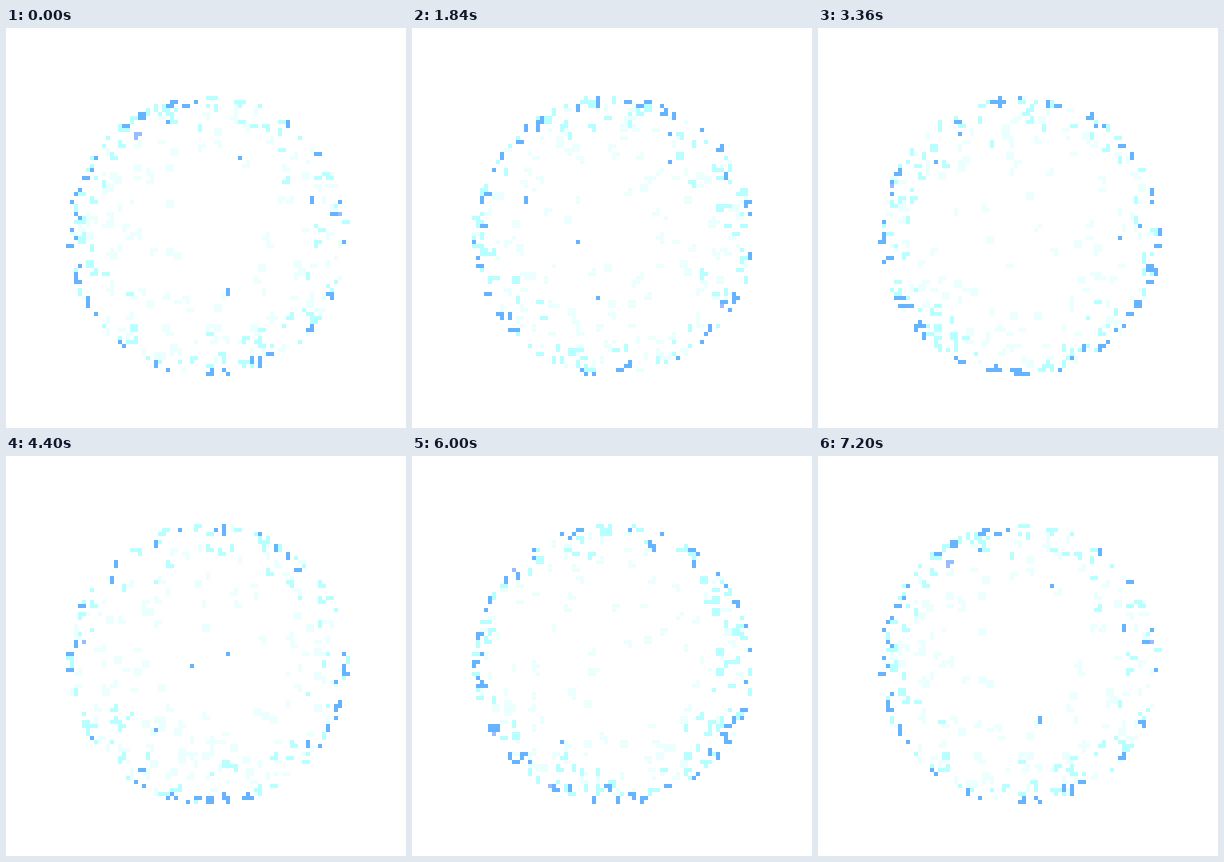
Recreate the animation shown at these times as an HTML page with a canvas. Size 400 by 400 pixels, loop 7.28 s.

```html
<!DOCTYPE html>
<html lang="en">
<head>
<meta charset="utf-8">
<title>Pixel sphere</title>
<style>
  html, body { margin: 0; width: 100%; height: 100%; overflow: hidden; background: #fff; }
  canvas { display: block; width: 400px; height: 400px; }
</style>
</head>
<body>
<canvas id="stage" width="400" height="400"></canvas>
<script>
const ctx = document.getElementById('stage').getContext('2d');
const CELL = 4, STEP = 80, STEPS = 91, TURN = 90;
const CX = 50.5, CY = 52, R = 34.7, COUNT = 720;
const BLUE = '#66b3ff', VIOLET = '#99bbff', CYAN = '#b8ffff', PALE = '#ecffff', WHITE = '#fff';

let seed = 20417;
function rand() {
  seed = (seed + 0x6d2b79f5) | 0;
  let n = Math.imul(seed ^ (seed >>> 15), seed | 1);
  n ^= n + Math.imul(n ^ (n >>> 7), n | 61);
  return ((n ^ (n >>> 14)) >>> 0) / 4294967296;
}

// Points spread evenly over the sphere
const points = Array.from({ length: COUNT }, () => {
  const y = rand() * 2 - 1;
  return {
    y,
    ring: Math.sqrt(1 - y * y),
    lon: rand() * Math.PI * 2,
    shift: rand() * 0.9 - 0.25,
    size: 0.5 + rand() * 0.28,
    edge: rand() < 0.03 ? VIOLET : BLUE,
    seeThrough: rand() < 0.015
  };
});

// Pale in front, blue towards the rim
function tint(p, z) {
  const light = z + p.shift * (1 - 0.6 * z);
  if (z < 0 || light < 0.3) return p.edge;
  if (light < 0.62) return CYAN;
  return light < 0.94 ? PALE : WHITE;
}

// Fill every cell whose centre lies inside the disc
function disc(x, y, r) {
  for (let j = Math.floor(y - r); j <= y + r; j++) {
    for (let i = Math.floor(x - r); i <= x + r; i++) {
      if (i < 15 || i > 85 || j < 17 || j > 86) continue;
      if (Math.hypot(i + 0.5 - x, j + 0.5 - y) < r) {
        ctx.fillRect(i * CELL, j * CELL, CELL, CELL);
      }
    }
  }
}

function draw(step) {
  const turn = step / TURN * Math.PI * 2;
  ctx.fillStyle = WHITE;
  ctx.fillRect(0, 0, 400, 400);
  points
    .map(p => ({
      p,
      x: p.ring * Math.sin(p.lon + turn),
      z: p.ring * Math.cos(p.lon + turn)
    }))
    .filter(q => q.z >= 0 || q.p.seeThrough)
    .sort((a, b) => a.z - b.z)
    .forEach(({ p, x, z }) => {
      ctx.fillStyle = tint(p, z);
      disc(CX + x * R, CY + p.y * R, p.size + 0.42 * Math.max(z, 0));
    });
}

let shown = -1;
const start = performance.now();
function tick() {
  const step = Math.floor((performance.now() - start) / STEP) % STEPS;
  if (step !== shown) draw(shown = step);
  requestAnimationFrame(tick);
}
tick();
</script>
</body>
</html>
```
